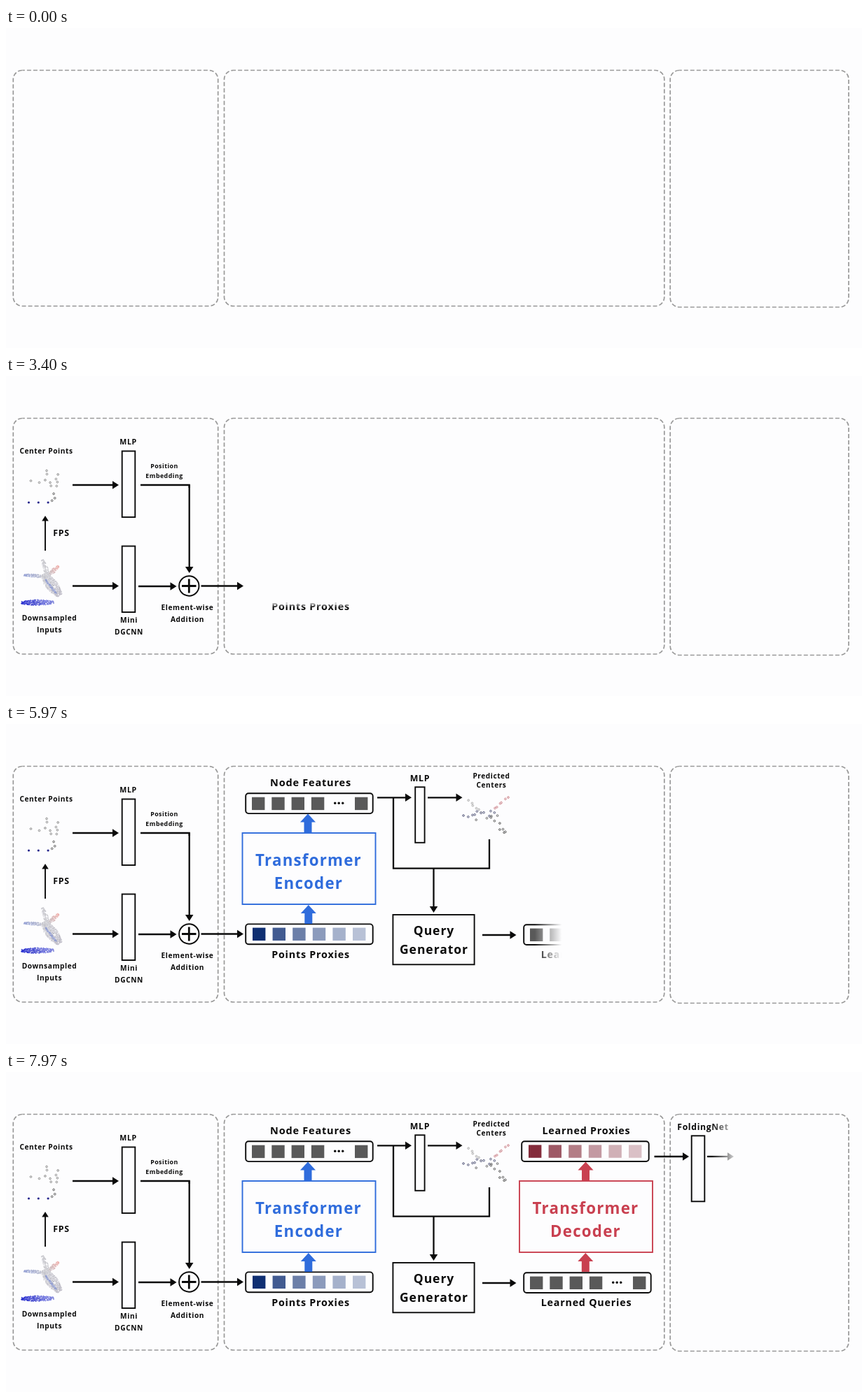
An HTML page that plays this animation: 1222x458 px, repeating every 8 s.

```html
<!DOCTYPE html>
<html lang="en">
<head>
<meta charset="utf-8">
<title>Point cloud completion pipeline</title>
<style>
html, body { margin: 0; width: 100%; height: 100%; overflow: hidden; background: #fdfdfe; }
svg { display: block; }
text { font-family: "Open Sans", "Noto Sans", sans-serif; font-weight: 700; letter-spacing: .055em; text-anchor: middle; }
</style>
</head>
<body>
<svg id="stage" width="1222" height="458" viewBox="0 0 1222 458"></svg>
<script>
const BLACK = '#0a0a0a', BLUE = '#2f6cdc', RED = '#c94050', GREY = '#595959', NAVY = '#24248c';
const LOOP = 8000, START = 768, STEP = 500, SOFT = 0.16;

let seed = 7;
const rand = () => (seed = (seed * 16807) % 2147483647) / 2147483647;
const jitter = size => (rand() - 0.5) * size;
const mix = (a, b, u) => a + (b - a) * u;
const repeat = (n, fn) => Array.from({ length: n }, (_, i) => fn(i)).join('');

// Lines of text centred on x; y is the middle of the first line's capitals
const label = (x, y, size, str, gap = 17, color = BLACK) => str.split('\n').map((s, i) =>
  `<text x="${x}" y="${y + i * gap + 0.36 * size}" font-size="${size}" fill="${color}">${s}</text>`).join('');

const box = (x, y, w, h, color = BLACK, r = 0) =>
  `<rect x="${x}" y="${y}" width="${w}" height="${h}" rx="${r}" fill="none" stroke="${color}" stroke-width="1.9"/>`;

const line = (d, width = 2.3) =>
  `<path d="${d}" fill="none" stroke="${BLACK}" stroke-width="${width}"/>`;

function arrow(x1, y1, x2, y2, width = 2.3) {
  const d = Math.hypot(x2 - x1, y2 - y1), ux = (x2 - x1) / d, uy = (y2 - y1) / d;
  const len = width * 3.9, half = width * 2.5, bx = x2 - ux * len, by = y2 - uy * len;
  return line(`M${x1} ${y1}L${bx + ux} ${by + uy}`, width) +
    `<path d="M${x2} ${y2}L${bx - uy * half} ${by + ux * half}L${bx + uy * half} ${by - ux * half}Z" fill="${BLACK}"/>`;
}

const blockArrow = (x, tip, base, color) =>
  `<path d="M${x} ${tip}l11 12h-5.5V${base}h-11V${tip + 12}h-5.5Z" fill="${color}"/>`;

const dot = (x, y, r, color) => `<circle cx="${x}" cy="${y}" r="${r}" fill="${color}"/>`;

const square = (x, y, color, alpha = 1) =>
  `<rect x="${x - 9.2}" y="${y - 9.2}" width="18.4" height="18.4" fill="${color}" fill-opacity="${alpha}"/>`;

const tray = (x, y) => box(x, y, 181.5, 28.8, BLACK, 4);

// Six squares, each paler than the one before
const proxies = (x, y, color) =>
  tray(x, y) + repeat(6, i => square(x + 19 + 28.6 * i, y + 14.4, color, 0.78 ** i));

// Four squares, dots, and a last square
const features = (x, y) =>
  tray(x, y) + repeat(4, i => square(x + 18 + 28.3 * i, y + 14.6, GREY)) + square(x + 165, y + 14.6, GREY) +
  repeat(3, i => dot(x + 127.5 + 5.5 * i, y + 14, 1.7, BLACK));

const transformer = (x, color, name) =>
  box(x - 95, 156, 190, 102, color) + label(x - 0.5, 194.5, 22.3, 'Transformer\n' + name, 33.5, color) +
  blockArrow(x - 0.7, 259, 286, color);

// Dots filling a stroke that bulges in the middle, blending between two colours
function cloud(x1, y1, x2, y2, width, c1, c2) {
  const d = Math.hypot(x2 - x1, y2 - y1), nx = (y1 - y2) / d, ny = (x2 - x1) / d;
  return repeat(Math.round(d * width * 0.9), () => {
    const u = rand(), v = jitter(width) * (0.45 + 0.55 * Math.sin(Math.PI * u)), shade = jitter(36);
    const rgb = c1.map((c, k) => Math.round(mix(c, c2[k], u) + shade));
    return dot((mix(x1, x2, u) + nx * v).toFixed(1), (mix(y1, y2, u) + ny * v).toFixed(1), 0.75, `rgb(${rgb})`);
  });
}

// Small rings spread evenly along a line, slightly shaken
const rings = (n, x1, y1, x2, y2, shake, color) => repeat(n, i => {
  const u = i / (n - 1);
  return `<circle cx="${mix(x1, x2, u) + jitter(shake)}" cy="${mix(y1, y2, u) + jitter(shake)}" r="1.35" fill="#eee" stroke="${color}" stroke-width=".9"/>`;
});

const pale = [208, 208, 213], sky = [150, 162, 212], rose = [236, 170, 166], ink = [42, 48, 205];
const plane =
  cloud(26, 285, 58, 287, 5, sky, pale) +
  cloud(52, 263, 62, 291, 7, pale, pale) +
  cloud(75, 272, 61, 285, 6, rose, pale) +
  cloud(53, 284, 77, 314, 17, pale, [196, 194, 204]) +
  cloud(56, 291, 72, 312, 3, sky, sky) +
  cloud(22, 324.5, 68, 324, 8, ink, [135, 140, 222]);

const centers =
  rings(2, 35.5, 150, 47.5, 152.5, 0, '#888') + rings(5, 56, 134, 61.5, 158, 6, '#888') +
  rings(4, 72, 141, 71, 158.5, 6, '#888') + rings(3, 70, 167, 67, 179, 4, '#555') +
  repeat(3, i => dot(32.5 + 13.8 * i, 181, 1.6, NAVY));

const predicted =
  rings(6, 662, 109, 678, 127, 5, '#aaa') + rings(10, 657, 132, 694, 126, 9, '#55587c') +
  rings(8, 692, 134, 713, 158, 8, '#555') + rings(6, 696, 122, 718, 104, 5, '#d08088') +
  rings(3, 672, 137, 702, 131, 3, '#666');

// Steps follow each other at a fixed pace; PULSE stresses all parts shown since the last one
const PULSE = null;
const steps = [
  plane + label(62, 346, 10.2, 'Downsampled\nInputs'),
  label(57.5, 107.3, 10.2, 'Center Points') + centers + arrow(56, 250, 56, 200, 1.9) +
    label(79, 225, 12.4, 'FPS') + arrow(95, 156, 161, 156) + arrow(95, 300.5, 161, 300.5),
  label(174.5, 94.5, 10.6, 'MLP') + box(165.7, 107.5, 18.6, 94.5) +
    box(165.7, 243.5, 18.6, 94.5) + label(175.5, 349.5, 10.2, 'Mini\nDGCNN'),
  label(226, 128.5, 8.8, 'Position\nEmbedding', 14.5) + line('M192 156H261.7V160') +
    arrow(261.7, 156, 261.7, 282) + arrow(189, 301, 243.5, 301) + box(247.1, 286.3, 28.4, 28.4, BLACK, 14.2) +
    line('M251 300.5H271.5M261.3 290.5V310.5', 2.8) + arrow(278.5, 300.5, 339, 300.5) +
    label(259, 331, 10.2, 'Element-wise\nAddition'),
  PULSE,
  ['up', proxies(342.2, 286.4, '#0f2f72') + label(435, 330, 14.3, 'Points Proxies')],
  ['up', transformer(432.5, BLUE, 'Encoder')],
  ['up', label(435, 84, 14.5, 'Node Features') + features(342.2, 99.3) + blockArrow(431, 128.5, 156, BLUE)],
  arrow(530, 105.3, 579, 105.3) + label(591, 78, 12.3, 'MLP') + box(584.2, 90.3, 13.4, 79.5) +
    arrow(602, 105.3, 651.5, 105.3) + label(693, 74, 10.1, 'Predicted\nCenters', 13) + predicted,
  ['down', line('M553 106V206.7H690V165') + arrow(610.5, 206, 610.5, 270) + box(552.4, 273, 116.2, 71.3) +
    label(611, 296, 17.5, 'Query\nGenerator', 27)],
  arrow(680, 302, 728.5, 302) + features(739.2, 287.2) + label(828.5, 330, 14.3, 'Learned Queries'),
  ['up', transformer(828, RED, 'Decoder')],
  ['up', label(828.5, 84, 14.3, 'Learned Proxies') + proxies(736.2, 99.2, '#842c3b') +
    blockArrow(827.5, 128.5, 156, RED)],
  PULSE,
  // the empty path widens the part to the end of its panel
  arrow(925.5, 121, 975, 121) + label(995, 79, 12.2, 'FoldingNet') + box(978.7, 91.3, 18.6, 94) +
    arrow(1001, 121, 1039, 121) + '<path d="M925 121H1185" fill="none"/>'
];

const panel = (x, w, h) =>
  `<rect x="${x}" y="60.5" width="${w}" height="${h}" rx="13" fill="none" stroke="#999" stroke-width="1.7" stroke-dasharray="6 3" stroke-dashoffset="20.4"/>`;

const stage = document.getElementById('stage');
stage.innerHTML =
  `<defs>
    <linearGradient id="fade" gradientUnits="userSpaceOnUse">
      <stop offset="0" stop-color="#fff"/><stop offset="1" stop-color="#fff" stop-opacity="0"/>
    </linearGradient>
    <mask id="wipe" maskUnits="userSpaceOnUse" x="0" y="0" width="1222" height="458">
      <rect width="1222" height="458" fill="url(#fade)"/>
    </mask>
  </defs>` +
  panel(10.3, 292.4, 337.5) + panel(311.5, 628.3, 337.5) + panel(948.2, 254.8, 339);

const parts = [];
steps.forEach((step, i) => {
  const time = START + i * STEP;
  if (step === PULSE) {
    for (const p of parts) p.pulse ??= time;
    return;
  }
  const [dir, art] = Array.isArray(step) ? step : ['right', step];
  const node = document.createElementNS(stage.namespaceURI, 'g');
  node.innerHTML = art;
  stage.append(node);
  parts.push({ node, dir, time, bounds: node.getBBox() });
});

const fade = document.getElementById('fade');

function setWipe(dir, b, p) {
  const size = dir === 'right' ? b.width : b.height, far = p * size * (1 + SOFT), near = far - size * SOFT;
  const ends = dir === 'right' ? [b.x + near, 0, b.x + far, 0]
    : dir === 'down' ? [0, b.y + near, 0, b.y + far]
    : [0, b.y + size - near, 0, b.y + size - far];
  ['x1', 'y1', 'x2', 'y2'].forEach((k, i) => fade.setAttribute(k, ends[i]));
}

function draw() {
  const t = performance.now() % LOOP;
  for (const { node, dir, time, pulse, bounds: b } of parts) {
    const p = (t - time) / STEP, u = (t - pulse) / STEP;
    node.style.display = p > 0 ? '' : 'none';
    if (p > 0 && p < 1) {
      setWipe(dir, b, p);
      node.setAttribute('mask', 'url(#wipe)');
    } else node.removeAttribute('mask');
    if (u > 0 && u < 1) {
      const s = 1 + 0.05 * (1 - Math.abs(2 * u - 1)), cx = b.x + b.width / 2, cy = b.y + b.height / 2;
      node.setAttribute('transform', `translate(${cx} ${cy}) scale(${s}) translate(${-cx} ${-cy})`);
      node.setAttribute('opacity', 1 - 0.5 * Math.min(1, u * 5, (1 - u) * 5));
    } else {
      node.removeAttribute('transform');
      node.removeAttribute('opacity');
    }
  }
  requestAnimationFrame(draw);
}
draw();
</script>
</body>
</html>
```
